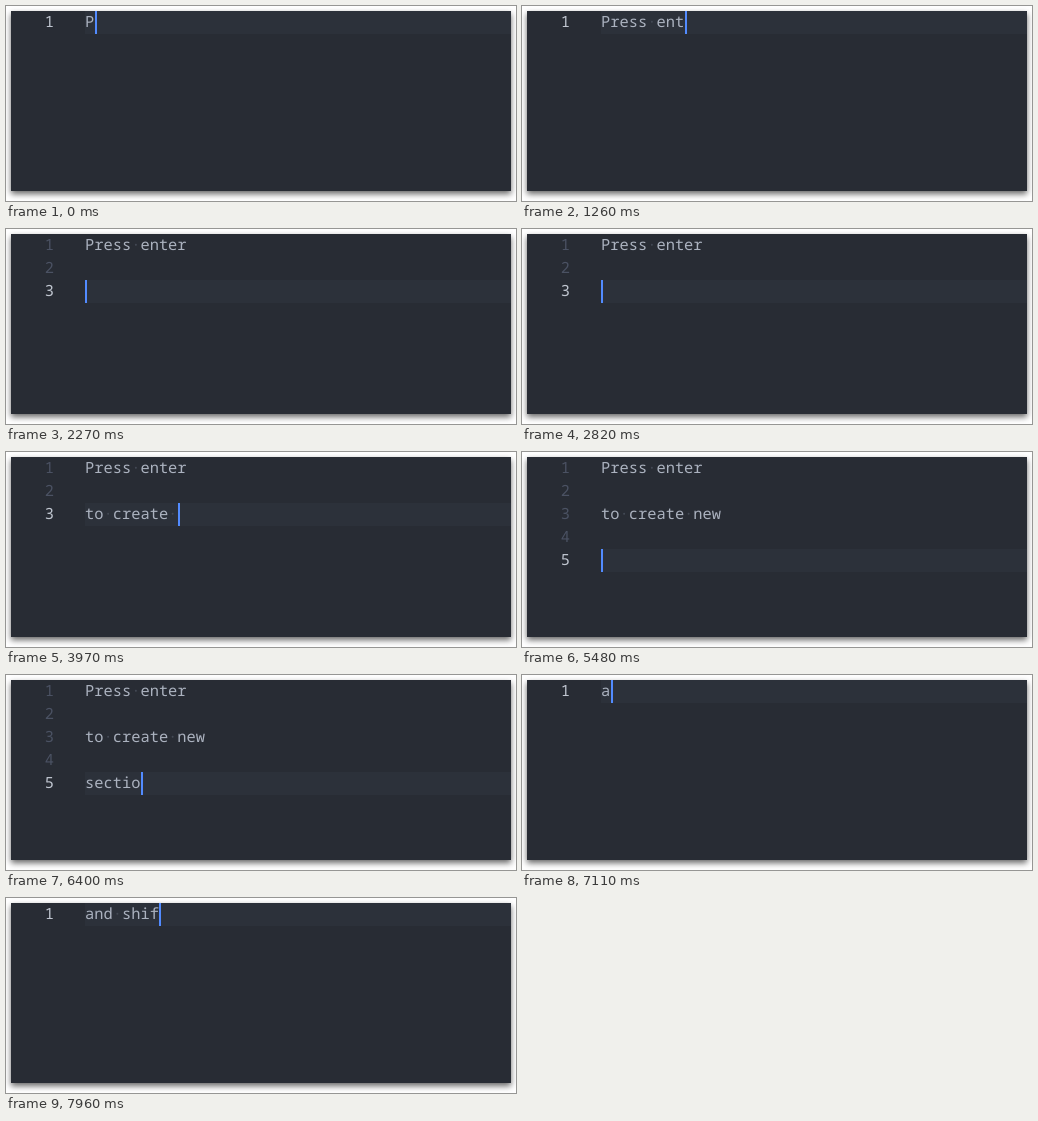
These frames come from a looping animation (510x195 px, 8000 ms). An HTML page:

```html
<!DOCTYPE html>
<html lang="en">
<head>
<meta charset="utf-8">
<title>Editor typing</title>
<style>
html, body { margin: 0; width: 100%; height: 100%; overflow: hidden; background: #fff; }
#editor {
  position: absolute; left: 5px; top: 5px; width: 500px; height: 180px;
  background: #282c34; color: #abb2bf;
  box-shadow: 0 3px 6px rgba(0, 0, 0, .6);
  font: 15.4px/23px "Noto Sans Mono", monospace;
  text-rendering: geometricPrecision;
  white-space: pre;
}
.row { position: relative; height: 23px; }
.row > * { position: absolute; top: 0; height: 23px; }
.number { left: 0; width: 43px; text-align: right; color: #4b5263; }
.code { left: 74px; right: 0; }
.label { position: relative; top: -1px; }
.space { color: #434954; }
.active .number { color: #c0c6d0; }
.active .code { background: #2c313a; }
.cursor { position: absolute; top: 0; width: 2px; height: 23px; background: #528bff; }
</style>
</head>
<body>
<div id="editor"></div>
<script>
const LOOP = 8000;
const CLEAR = "\f";
const editor = document.getElementById("editor");
const keys = [];

// Spreads the keystrokes of a text evenly from start to end.
function type(text, start, end = start) {
  const gap = text.length > 1 ? (end - start) / (text.length - 1) : 0;
  [...text].forEach((key, i) => keys.push({ key, time: start + i * gap }));
}

type("P", 0);
type("ress e", 30, 1030);
type("n", 1110);
type("ter", 1260, 1580);
type("\n\n", 2110, 2260);
type("to create", 2900, 3820);
type(" ", 3970);
type("new", 4290, 4460);
type("\n\n", 4780, 4930);
type("section", 5560, 6480);
type(CLEAR, 7010);
type("a", 7110);
type("nd shif", 7260, 7960);

function rowHtml(line, index, lines) {
  const active = index === lines.length - 1;
  const label = line.replace(/ /g, '<span class="space">·</span>');
  const cursor = active
    ? `<div class="cursor" style="left:calc(${line.length}ch + .4px)"></div>` : "";
  return `<div class="row${active ? " active" : ""}">` +
    `<div class="number"><span class="label">${index + 1}</span></div>` +
    `<div class="code"><span class="label">${label}</span>${cursor}</div></div>`;
}

let shown = -1;
function draw() {
  const time = performance.now() % LOOP;
  const pressed = keys.filter(k => k.time <= time + 0.01);
  if (pressed.length !== shown) {
    shown = pressed.length;
    const text = pressed.map(k => k.key).join("").split(CLEAR).pop();
    editor.innerHTML = text.split("\n").map(rowHtml).join("");
  }
  requestAnimationFrame(draw);
}
draw();
</script>
</body>
</html>
```
